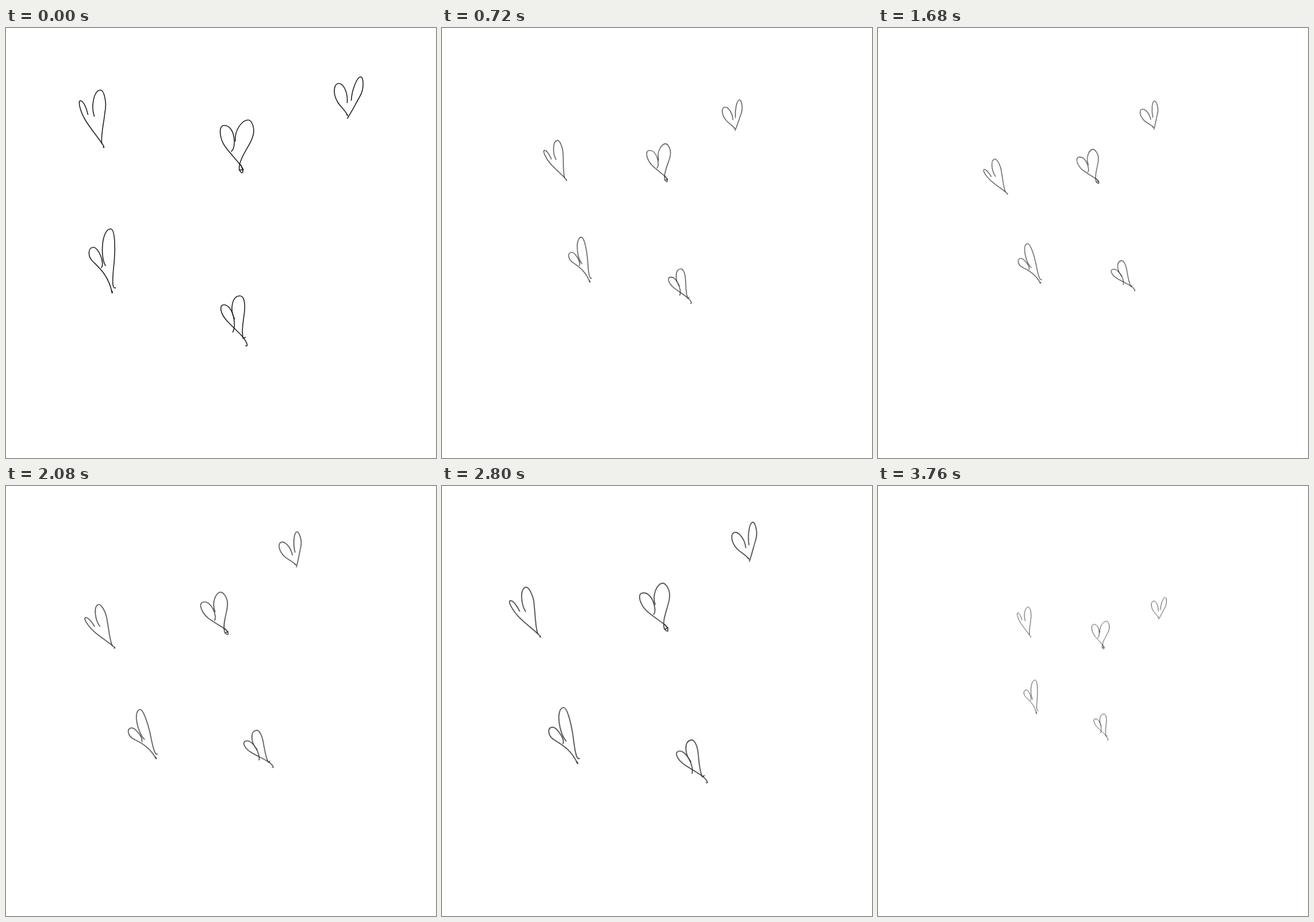
These frames come from a looping animation (748x748 px, 3.84 s). An HTML page:

```html
<!DOCTYPE html>
<html lang="en">
<head>
<meta charset="utf-8">
<title>Swaying hearts</title>
<style>
  html, body { margin: 0; width: 100%; height: 100%; overflow: hidden; background: #fff; }
  svg { display: block; width: 100vw; height: 100vh; }
  #hearts {
    fill: none;
    stroke: #222;
    stroke-width: 1.6;
    stroke-linecap: round;
    stroke-linejoin: round;
    transform-origin: 374px 320px;
  }
</style>
</head>
<body>
<svg viewBox="0 0 748 748">
  <g id="hearts">
    <!-- top left -->
    <path d="M142.5 150.5C140.5 141 135 126.5 129.5 126.5S130 147 138.5 161S160 190 167 201"/>
    <path d="M153.5 153.5C147.5 136 153 108 164.5 108C170 108 176 128 172 147C170.5 163 165 186 166.500 200C167 203 170 202 170.500 208L169 207"/>
    <!-- centre -->
    <path d="M392 214.5C401 209 399 170 380 169.5C369 169 371 191 381 206C389 217 403 232 408 238.5L413 246.500L405.500 247"/>
    <path d="M399 197C397 176 412 160 421 160C428 160 434.5 176 428.5 191C424 205 406 226 405.500 244C406 249 411 255 412 250C412 246 410 242 408.500 238"/>
    <!-- top right -->
    <path d="M593.5 130C595 112 587 96.5 579 96.5S567 112 577 129C582 137 591 144 594.5 152.5L592.5 150.5"/>
    <path d="M600.5 126C602 106 611 85 617 85C622 85 624 106 614.5 121C608 132 603 143 594 157"/>
    <!-- lower left -->
    <path d="M166 417C172 409 161 381.5 152 381.5S141 396 151 406S179 431 184.5 461L183 455L185.5 460"/>
    <path d="M173 413.5C163 396 167 349.5 182 349.5C190 349.5 190 385 188.5 403S182 455 190.5 452"/>
    <!-- bottom -->
    <path d="M394.5 529C402 516 394 481.5 379 481.5C370 481.5 373 497 384 509C393 519 409 533 414 540S422 555 417 552.5"/>
    <path d="M397.5 506C389 490 393 466 407 466C415 466 416.5 482 414.5 496C412.5 512 409.5 528 412.5 540L416.5 538"/>
  </g>
</svg>
<script>
  const LOOP = 3840, STEP = 80, STEPS = LOOP / STEP;
  const HALF = 1280;       // time from largest to smallest
  const MIN_SCALE = 0.495;
  const SWING = 17.4;      // degrees, counter-clockwise

  function pose(t) {
    const phase = t % (2 * HALF) / HALF;
    const scale = MIN_SCALE + (1 - MIN_SCALE) * Math.abs(1 - phase);
    const angle = -SWING * Math.sin(Math.PI * t / LOOP);
    return `rotate(${angle}deg) scale(${scale})`;
  }

  // Each pose is held for one step; the loop restarts with a hard cut.
  const frames = Array.from({ length: STEPS + 1 }, (_, i) => ({
    offset: i / STEPS,
    transform: pose(i * STEP),
    easing: 'steps(1, end)'
  }));

  document.getElementById('hearts').animate(frames, { duration: LOOP, iterations: Infinity });
</script>
</body>
</html>
```
